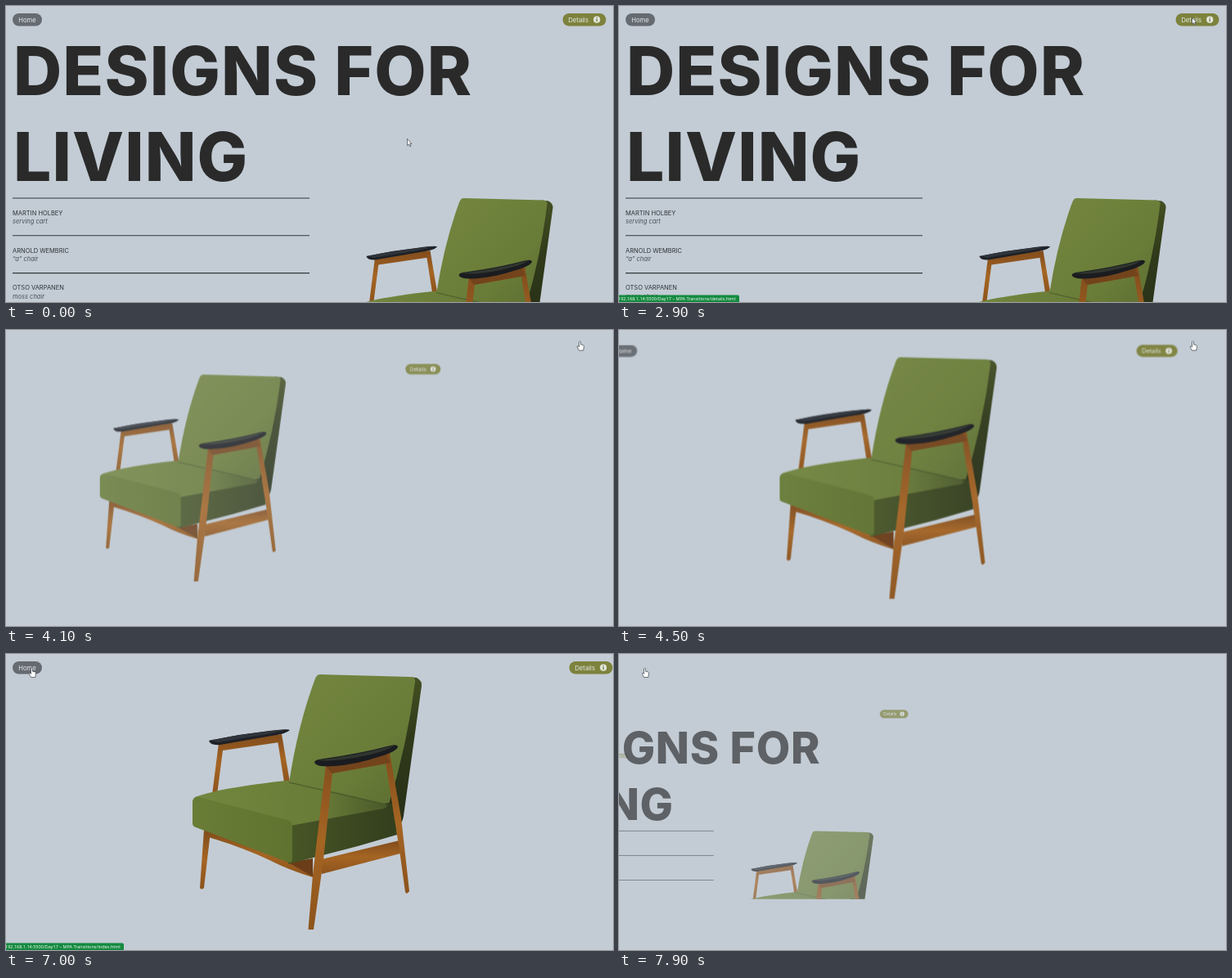
Animation, 742 px wide and 362 px high, one loop 8000 ms. Source, as an HTML page:

```html
<!DOCTYPE html>
<html lang="en">
<head>
<meta charset="utf-8">
<title>Designs for living</title>
<style>
  html, body { margin: 0; width: 100%; height: 100%; overflow: hidden; background: #c3ccd5; }
  svg { display: block; font-family: Inter, "Liberation Sans", sans-serif; }
  .title { font-size: 82px; font-weight: 800; letter-spacing: 1.1px; fill: #2a2a2a; }
  .name { font-size: 7.5px; fill: #2f3236; }
  .piece { font-size: 7.5px; font-style: italic; fill: #4b4f55; }
  .rule { stroke: #34373b; stroke-width: 1.1; }
  .pill { font-size: 7.7px; fill: #e6eaec; }
  .status { font: 5.5px "Open Sans", "Noto Sans", sans-serif; fill: #fff; }
</style>
</head>
<body>
<svg width="742" height="362" viewBox="0 0 742 362">
  <defs>
    <clipPath id="view"><rect width="742" height="362"/></clipPath>
    <linearGradient id="back" x1="0" y1="0" x2="1" y2="1">
      <stop offset="0" stop-color="#748640"/><stop offset=".6" stop-color="#6a7d38"/><stop offset="1" stop-color="#5b6c31"/>
    </linearGradient>
    <linearGradient id="side" x1="0" y1="0" x2="0" y2="1">
      <stop offset="0" stop-color="#444f22"/><stop offset=".4" stop-color="#303a1a"/><stop offset="1" stop-color="#262e17"/>
    </linearGradient>
    <linearGradient id="seat" x1="0" y1="0" x2="1" y2="0">
      <stop offset="0" stop-color="#73873f"/><stop offset=".65" stop-color="#697c38"/><stop offset="1" stop-color="#4a5929"/>
    </linearGradient>
    <linearGradient id="front" x1="0" y1="0" x2="1" y2="0">
      <stop offset="0" stop-color="#6a7d37"/><stop offset="1" stop-color="#5f722f"/>
    </linearGradient>
    <linearGradient id="flank" x1="0" y1="0" x2="1" y2="0">
      <stop offset="0" stop-color="#485626"/><stop offset="1" stop-color="#333e1d"/>
    </linearGradient>
    <linearGradient id="wood" x1="0" y1="0" x2="0" y2="1">
      <stop offset="0" stop-color="#804b1c"/><stop offset=".5" stop-color="#a56523"/><stop offset="1" stop-color="#8c531c"/>
    </linearGradient>

    <g id="chair">
      <g fill="url(#wood)">
        <path d="M247 216L345 253L375 259L375 273Q345 264 322 252Q285 235 247 224Z"/>
        <path d="M386 251L481 228L482 244L386 269Z"/>
        <path d="M242 215L250 217L242 286Q239 289 237 286Z"/>
        <path d="M260 109L332 97L334 108L265 118L258 172L252 172Z"/>
        <path d="M331 99L337 98L347 157L340 157Z"/>
      </g>
      <path d="M336 250L352 254L375 250L375 272Z" fill="#6b3d18"/>
      <path d="M248 106Q285 98 322 94Q345 91 347 93Q342 98 325 100L262 111Q250 112 248 106Z" fill="#1e2126"/>
      <path d="M249 106Q290 97 345 92L325 97L260 108Z" fill="#30343b"/>
      <path d="M492 28L502 29Q509 33 508 39L486 198Q484 212 470 215L455 186Z" fill="url(#side)"/>
      <path d="M384 25L495 28Q501 29 500 34Q491 110 467 187L346 157Q357 86 378 30Q380 25 384 25Z" fill="url(#back)"/>
      <path d="M345 205L467 182Q474 183 476 191L478 221L430 235L345 257Z" fill="url(#flank)"/>
      <path d="M231 175Q260 164 341 155Q350 154 360 158L463 183Q468 187 462 189L353 209Q349 211 345 208L230 179Z" fill="url(#seat)"/>
      <path d="M228 180Q229 174 236 175L344 203Q350 205 350 211L350 251Q349 257 343 254L232 212Q228 211 228 207Z" fill="url(#front)"/>
      <path d="M346 157L467 185" stroke="#47562a" fill="none"/>
      <g fill="url(#wood)">
        <path d="M462 120L469 121L483 200L493 290Q490 295 488 291L481 240Z"/>
        <path d="M391 136L464 120L471 133L399 146L388 252L376 337L369.5 337L375 270Z"/>
      </g>
      <path d="M392 138L464 121L470 133L398 146Z" fill="#73441b"/>
      <path d="M377 132Q378 129 388 128Q432 122 470 112Q479 110 479 114Q476 120 455 126Q428 135 402 137Q378 139 377 132Z" fill="#1a1c20"/>
      <path d="M380 130Q430 124 474 112Q465 119 436 125Q405 132 380 130Z" fill="#30362f"/>
    </g>

    <g id="homePill">
      <rect x="8" y="9" width="36" height="15.6" rx="7.8" fill="#666a71"/>
      <text class="pill" x="26" y="19.6" text-anchor="middle">Home</text>
    </g>
    <g id="detailsPill">
      <rect x="680.5" y="9" width="53" height="15.6" rx="7.8" fill="#7d823c"/>
      <text class="pill" x="687.3" y="19.6">Details</text>
      <circle cx="722.2" cy="16.7" r="4.1" fill="#e2e6da"/>
      <path d="M722.2 14.1v1.1M722.2 16.1v3" stroke="#5f642f" stroke-width="1.1"/>
    </g>
  </defs>

  <rect width="742" height="362" fill="#c3ccd5"/>

  <g id="home"><g clip-path="url(#view)">
    <use href="#homePill"/>
    <use href="#detailsPill"/>
    <text class="title" x="9" y="109">DESIGNS FOR</text>
    <text class="title" x="9" y="214">LIVING</text>
    <g id="list"></g>
    <use href="#chair" transform="translate(222.9 213) scale(.877)"/>
  </g></g>

  <g id="details"><g clip-path="url(#view)">
    <use href="#homePill"/>
    <use href="#detailsPill" x="8"/>
    <use href="#chair"/>
  </g></g>

  <g id="status">
    <path id="tag" fill="#148a3f"/>
    <text id="link" class="status" x="-1" y="360.4"></text>
  </g>

  <g id="cursor" stroke="#3a3e43" stroke-width=".7" stroke-linejoin="round" fill="#fff">
    <path id="arrow" d="M0 0V8.2L1.9 6.5L3.2 9.4L4.5 8.8L3.2 6H5.4Z"/>
    <path id="hand" d="M-1 .8Q0 -.6 1 .8V4.2L4 4.9Q5.3 5.3 5 7L4.2 11.5H-1L-3.2 7.4Q-3.4 6 -2.2 6.2L-1 7.4Z"/>
  </g>
</svg>

<script>
const LOOP = 8000, STEP = 100, SLIDE = 1940;
const $ = id => document.getElementById(id);
const clamp = v => Math.max(0, Math.min(1, v));

const pieces = [
  ["MARTIN HOLBEY", "serving cart"],
  ["ARNOLD WEMBRIC", "“a” chair"],
  ["OTSO VARPANEN", "moss chair"],
];
$("list").innerHTML = pieces.map(([name, piece], i) => {
  const y = 235 + i * 45.8;
  return `<path class="rule" d="M8 ${y}H371"/>
    <text class="name" x="8" y="${y + 20.7}">${name}</text>
    <text class="piece" x="8" y="${y + 31.2}">${piece}</text>`;
}).join("");

const slides = [
  { from: "home", to: "details", start: 3113 },
  { from: "details", to: "home", start: 7159 },
];
const hovers = [
  { show: 2400, start: 3113, file: "details.html", width: 147 },
  { show: 6400, start: 7159, file: "index.html", width: 144 },
];
// time, x, y of the pointer tip
const track = [
  [0, 490.5, 162.5], [400, 490.5, 162.5], [700, 380.5, 176],
  [1200, 380.5, 176], [1500, 516.5, 81.5], [1800, 516.5, 81.5],
  [2400, 700.5, 14], [2900, 700.5, 14], [3000, 701.5, 13.5],
  [4600, 701.5, 13.5], [5400, 264.5, 47.5], [5500, 264.5, 47.5],
  [6400, 31.5, 17], [8000, 31.5, 17],
];

// cubic-bezier(.25, .1, .25, 1)
function ease(x) {
  const curve = (u, a, b) => 3 * u * (1 - u) ** 2 * a + 3 * u * u * (1 - u) * b + u ** 3;
  let lo = 0, hi = 1;
  for (let i = 0; i < 24; i++) {
    const mid = (lo + hi) / 2;
    if (curve(mid, .25, .25) < x) lo = mid; else hi = mid;
  }
  return curve(lo, .1, 1);
}

function place(id, size) {
  const page = $(id);
  page.style.display = size > .001 ? "" : "none";
  page.setAttribute("opacity", size);
  page.setAttribute("transform",
    `translate(${371 - 742 * (1 - size)} 181) scale(${size}) translate(-371 -181)`);
}

function drawPages(t) {
  const slide = t < slides[1].start ? slides[0] : slides[1];
  const passed = t - slide.start;
  const p = passed < 60 ? 0 : passed >= SLIDE ? 1 : ease(passed / SLIDE);
  place(slide.from, 1 - p);
  place(slide.to, p);
  $("status").before($(slide.to));
}

function drawStatus(t) {
  const hover = t < 5000 ? hovers[0] : hovers[1];
  const alpha = Math.min(clamp((t - hover.show) / 300), clamp((hover.start + 370 - t) / 250));
  $("status").setAttribute("opacity", alpha);
  $("link").textContent = "192.168.1.14:5500/Day17 – MPA Transitions/" + hover.file;
  $("tag").setAttribute("d", `M0 353.5H${hover.width - 2}q2 0 2 2V362H0Z`);
}

function drawCursor(t) {
  const i = track.findIndex((k, n) => n && t <= k[0]);
  const [t0, x0, y0] = track[i - 1], [t1, x1, y1] = track[i];
  const u = (t - t0) / (t1 - t0), f = u * u * (3 - 2 * u);
  const hand = (t >= 3000 && t <= 4600) || t >= 6400;
  $("cursor").setAttribute("transform", `translate(${x0 + (x1 - x0) * f} ${y0 + (y1 - y0) * f})`);
  $("arrow").style.display = hand ? "none" : "";
  $("hand").style.display = hand ? "" : "none";
}

const begin = performance.now();
function draw() {
  const t = Math.floor((performance.now() - begin) % LOOP / STEP) * STEP;
  drawPages(t);
  drawStatus(t);
  drawCursor(t);
  requestAnimationFrame(draw);
}
draw();
</script>
</body>
</html>
```
